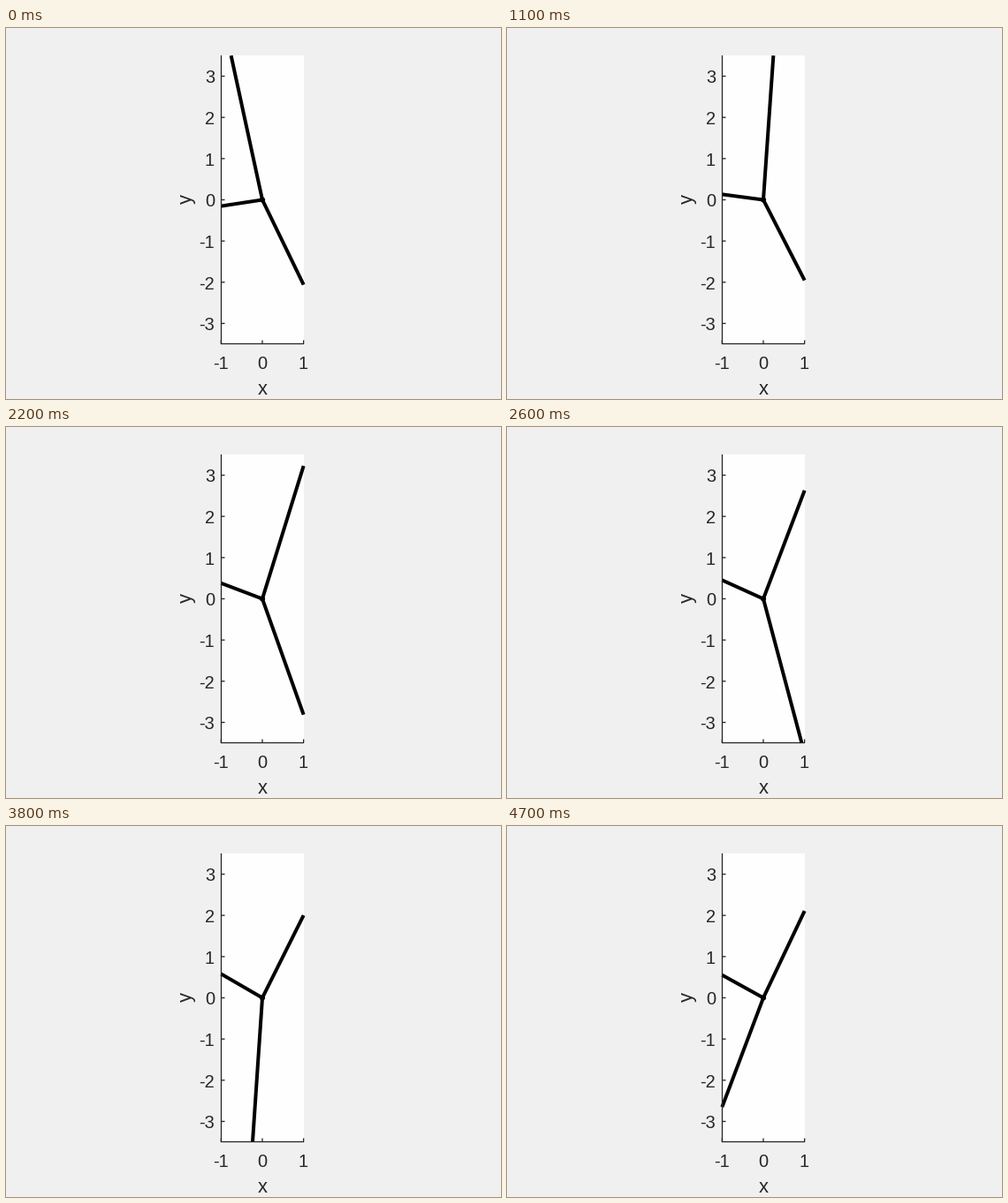
Recreate the animation shown at these times as a matplotlib script. Size 560 by 420 pixels, loop 4800 ms.

```python
import numpy as np
import matplotlib.pyplot as plt
from matplotlib.animation import FuncAnimation
from matplotlib.patches import Circle, Ellipse, Polygon, Rectangle

W, H, DPI = 560, 420, 100
FRAMES, INTERVAL = 48, 100
PX = 72 / DPI                      # points per pixel
CX, CY, UNIT = 290, 194.5, 46.65   # hub and pixels per data unit
XLIM, YLIM = 1.0, 3.5
LEFT, BOTTOM = 243.5, 357.5
OMEGA = 0.0388                     # radians per frame
SPREAD = 86.45                     # fixed angle between upper and left arm
INK, ICON = "#262626", "#9c9c9c"

fig = plt.figure(figsize=(W / DPI, H / DPI), dpi=DPI, facecolor="#f0f0f0")
ax = fig.add_axes([0, 0, 1, 1])
ax.set_xlim(0, W)
ax.set_ylim(H, 0)
ax.axis("off")


def to_px(x, y):
    return CX + UNIT * x, CY - UNIT * y


def stroke(xs, ys, width=1.3, color=INK, zorder=5, cap="butt"):
    return ax.plot(xs, ys, color=color, lw=width * PX, zorder=zorder,
                   solid_capstyle=cap, snap=False)[0]


def label(x, y, text, size=20, **kw):
    ax.text(x, y, text, family="Liberation Sans", fontsize=size * PX,
            color=INK, va="baseline", **kw)


def draw_axes():
    ax.add_patch(Rectangle((243, 31), 94, 327, fc="#fefefe", ec="none", zorder=0))
    stroke([LEFT, LEFT], [31, 358])
    stroke([243, 337], [BOTTOM, BOTTOM])
    for v in range(-3, 4):
        y = to_px(0, v)[1]
        stroke([LEFT, LEFT + 4], [y, y])
        label(225 - 6.7 * (v < 0), y + 7.7, str(v))
    for v in (-1, 0, 1):
        x = to_px(v, 0)[0]
        stroke([x, x], [BOTTOM, BOTTOM - 4])
        label(x - 5.8 - 3.4 * (v < 0), 386, str(v))
    label(284.6, 415, "x", 22)
    label(209.7, 193.8, "y", 22, rotation=90, rotation_mode="anchor", ha="center")


def draw_toolbar():
    parts = []

    def line(x0, y0, x1, y1, width=1.1):
        parts.append(stroke([x0, x1], [y0, y1], width, ICON, cap="round"))

    def outline(shape):
        shape.set(fc="none", ec=ICON, lw=1.1 * PX, snap=False)
        parts.append(ax.add_patch(shape))

    # export: tray and arrow
    line(200, 26, 213, 26)
    line(200, 21, 200, 26)
    line(202, 22, 210, 16)
    outline(Polygon([(207, 13), (211, 16), (208, 20)], closed=False))
    outline(Polygon([(211, 24), (215, 24), (213, 27)]))
    # brush
    outline(Rectangle((227, 13), 3, 7))
    outline(Polygon([(225, 20), (232, 20), (234, 27), (222, 27)]))
    line(225, 21.5, 232, 21.5, 2)
    # data tip
    outline(Rectangle((240.5, 13), 13.5, 14))
    for y in (18, 22):
        line(244, y, 251, y)
    # hand: fingers fan out of the palm
    outline(Ellipse((267.5, 23), 8, 8))
    for lean in (-2, -0.7, 0.7, 2):
        line(267.5 + 1.5 * lean, 20, 267.5 + 2 * lean, 12.5 + abs(lean), 1.6)
    line(264, 23, 260.5, 19.5, 1.6)
    # zoom in and out
    for x in (285.5, 305.5):
        outline(Circle((x, 18.5), 5.7))
        line(x + 4, 22.5, x + 9, 27.5, 1.8)
        line(x - 3, 18.5, x + 3, 18.5)
    line(285.5, 15.5, 285.5, 21.5)
    # home
    outline(Polygon([(319, 20.5), (327, 12.5), (335, 20.5)], closed=False))
    outline(Rectangle((321.5, 19), 11, 8))
    outline(Rectangle((325, 21.5), 4, 5.5))
    return parts


def swing(i, rest, size, turn):
    """Harmonic swing in degrees that turns back at frame `turn`."""
    return rest + size * (1 - np.cos(OMEGA * (i - turn)))


def arm_end(deg):
    """Where a ray from the hub meets the plot limits, in pixels."""
    c, s = np.cos(np.radians(deg)), np.sin(np.radians(deg))
    r = min(XLIM / max(abs(c), 1e-9), YLIM / max(abs(s), 1e-9))
    return to_px(r * c, r * s)


draw_axes()
toolbar = draw_toolbar()
arms = [stroke([], [], 4, "black", zorder=4) for _ in range(3)]
ax.add_patch(Circle((CX, CY), 3.1, color="black", lw=0, zorder=4))


def update(i):
    upper = swing(i, 63.3, 39.2, 40.3)
    lower = swing(i, -62.3, -49.3, 7)
    for arm, deg in zip(arms, (upper, upper + SPREAD, lower)):
        x, y = arm_end(deg)
        arm.set_data([CX, x], [CY, y])
    for part in toolbar:
        part.set_visible(14 <= i <= 16)
    return arms + toolbar


anim = FuncAnimation(fig, update, frames=FRAMES, interval=INTERVAL,
                     repeat=True, repeat_delay=0, blit=False)
plt.show()
```
